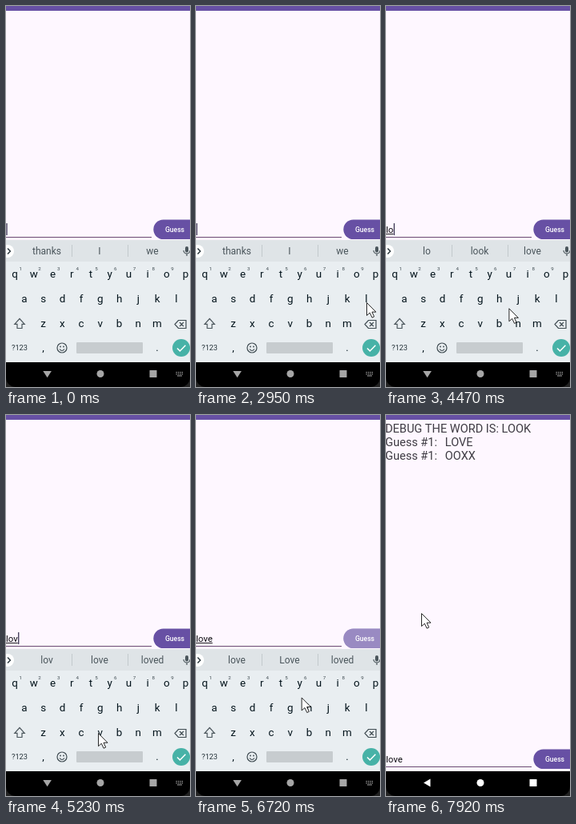
These frames come from a looping animation (230 by 477 pixels, 8000 ms). An HTML page with a canvas:

```html
<!DOCTYPE html>
<html lang="en">
<head>
<meta charset="utf-8">
<title>Word guess</title>
<style>
html, body { margin: 0; width: 100%; height: 100%; overflow: hidden; background: #000; }
canvas { display: block; }
</style>
</head>
<body>
<canvas id="stage" width="230" height="477"></canvas>
<script>
const screen2d = document.getElementById('stage').getContext('2d');
const layer = new OffscreenCanvas(230, 477);   // keyboard, faded as one piece
const layer2d = layer.getContext('2d');
let c = screen2d;

const PURPLE = '#6750a4', INK = '#04141c', LOOP = 8000;
const HIDE = 7380, HIDE_MS = 250, PAN = 151;

// time, typed text, suggestions
const typing = [
  [0, '', ['thanks', 'I', 'we']],
  [3150, 'l', ['l', 'let', 'love']],
  [4080, 'lo', ['lo', 'look', 'love']],
  [5080, 'lov', ['lov', 'love', 'loved']],
  [6000, 'love', ['love', 'Love', 'loved']]
];
const blinks = [280, 770, 1260, 1760, 2280, 2740];
// time, x, y
const mousePath = [
  [2740, 231, 345], [2950, 213, 371], [3400, 212, 370], [3640, 207, 343],
  [3820, 204, 339], [4150, 203, 338], [4700, 118, 407], [4820, 115, 399],
  [5300, 115, 398], [5650, 58, 336], [6050, 57, 336], [6400, 205, 279],
  [6550, 205, 279], [6720, 132, 353], [6950, 52, 454], [7460, 48, 451],
  [7820, 44, 252], [7920, 44, 248]
];

const clamp = v => Math.max(0, Math.min(1, v));

function text(s, x, y, size, color, align = 'center', weight = 400) {
  c.font = `${weight} ${size}px Roboto, sans-serif`;
  c.fillStyle = color;
  c.textAlign = align;
  c.fillText(s, x, y);
}
function box(x, y, w, h, color, r = 0) {
  c.fillStyle = color;
  c.beginPath();
  c.roundRect(x, y, w, h, r);
  c.fill();
}
function dot(x, y, r, color) { box(x - r, y - r, 2 * r, 2 * r, color, r); }
function path(d, stroke, fill, width = 1.2) {
  const p = new Path2D(d);
  if (fill) { c.fillStyle = fill; c.fill(p); }
  if (stroke) { c.strokeStyle = stroke; c.lineWidth = width; c.stroke(p); }
}

function caretOn(t, last) {
  return last ? (t - last) % 1000 < 500 : blinks.filter(b => b <= t).length % 2 === 0;
}

function drawApp(t, pan, typed, last) {
  c.save();
  c.translate(0, pan);
  box(0, 0, 230, 446, '#fef7ff');
  if (t >= 6550) {
    const gray = '#3f3c44';
    text('DEBUG THE WORD IS: LOOK', -1, 22, 14.55, gray, 'left');
    ['LOVE', 'OOXX'].forEach((word, i) => {
      text('Guess #1:', -1, 39 + 17 * i, 14.55, gray, 'left');
      text(word, 73.8, 39 + 17 * i, 14.55, gray, 'left');
    });
  }
  text(typed, 0, 435, 11.4, '#0c0a10', 'left');
  const w = c.measureText(typed).width;
  if (typed && t < HIDE) box(0, 436, w, 1, '#1d1b20');
  if (caretOn(t, last)) box(w + .3, 423, 1.4, 15, '#4a4360');
  box(0, 440, 182, 1, '#6a4a72');
  box(184.3, 418.4, 60, 24.6, PURPLE, 12.3);
  if (t > 6540 && t < 7000) {
    c.globalAlpha = .33 * clamp((t - 6540) / 80) * clamp((7000 - t) / 200);
    box(184.3, 418.4, 60, 24.6, '#fff', 12.3);
    c.globalAlpha = 1;
  }
  text('Guess', 211, 434, 8.6, '#fff', 'center', 500);
  c.restore();
  box(0, 0, 230, 6, PURPLE);
}

function keyRow(keys, x, y) {
  [...keys].forEach((k, i) => text(k, x + 23.72 * i, y, 13.4, INK));
}

function drawKeyboard(words) {
  box(0, 293, 230, 153, '#e9eef1');
  box(0, 293, 230, 27, '#dfe4e7');
  dot(2, 307, 8, '#fff');
  path('M2 303.5l3.4 3.5-3.4 3.5', '#263238', null, 1.4);
  if (words) {
    words.forEach((s, i) => text(s, 51 + 66 * i, 311, 12, '#4a555b'));
    box(82, 299, 1, 15, '#c3c9cc');
    box(152, 299, 1, 15, '#c3c9cc');
  }
  box(224, 301, 4, 7.5, '#4b565c', 2);
  path('M222 306a4 4 0 0 0 8 0M226 310v3', '#4b565c', null, 1.2);

  keyRow('qwertyuiop', 11, 340);
  [...'123456789'].forEach((n, i) => text(n, 18.2 + 23.72 * i, 331, 6.2, '#3f4b51'));
  keyRow('asdfghjkl', 23, 370.5);
  keyRow('zxcvbnm', 46.6, 402);
  path('M17 391.5l6.2 6.8h-3.2v5.2h-6v-5.2h-3.2z', '#4b565c');
  path('M215.5 393.5h9.5v10h-9.5l-4.5-5zM217 396l5 5M222 396l-5 5', '#3f4b51');

  text('?123', 17, 431, 9.2, '#26333a');
  text(',', 46.5, 432, 13, INK);
  path('M76 428a6 6 0 1 1-12 0a6 6 0 1 1 12 0M67 429.5q3 4 6 0', '#3f4b51');
  dot(68, 426.5, .9, '#3f4b51');
  dot(72, 426.5, .9, '#3f4b51');
  box(88, 421, 83, 14, '#c7cccf', 1);
  text('.', 189, 432, 13, INK);
  dot(219, 428, 11, '#47b2a7');
  path('M214 428.5l3.4 3.4 7-7.2', '#fff', null, 1.5);
}

function fadeKeyboard(words, k) {
  layer2d.clearRect(0, 0, 230, 477);
  c = layer2d;
  drawKeyboard(words);
  c = screen2d;
  c.globalAlpha = 1 - k ** 1.4;
  c.drawImage(layer, 0, Math.round(22 * k));
  c.globalAlpha = 1;
}

function drawNav(t) {
  const open = t < HIDE, color = open ? '#a6a6a6' : '#fff';
  const press = clamp((t - 7300) / 80) * clamp((7780 - t) / 200);
  if (press) {
    c.globalAlpha = press;
    box(23, 446.5, 58, 28, 'rgba(120,120,120,.3)', 14);
    c.globalAlpha = 1;
  }
  path(open ? 'M46.3 457h10.6l-5.3 8.3z' : 'M55.5 455.5v10l-8.5-5z', null, color);
  dot(118, 460.5, 4.5, color);
  box(179.5, 456, 9, 9, color, .5);
  if (open) {
    for (let i = 0; i < 8; i++) box(212.5 + 2.4 * (i % 4), 458 + 2.2 * (i >> 2), 1.3, 1.2, color);
    box(214, 462.5, 6, 1, color);
  }
}

function drawMouse(t) {
  const i = mousePath.findIndex(p => p[0] > t);
  if (i === 0) return;
  const b = i < 0 ? mousePath.at(-1) : mousePath[i];
  const a = i < 0 ? b : mousePath[i - 1];
  const k = i < 0 ? 0 : (t - a[0]) / (b[0] - a[0]);
  c.save();
  c.translate(a[1] + (b[1] - a[1]) * k, a[2] + (b[2] - a[2]) * k);
  path('M.5.5v16l3.8-3.4 2.8 6 2.6-1.2-2.7-5.8h5z', '#111', '#fff', .9);
  c.restore();
}

function draw(now) {
  const t = now % LOOP;
  const [last, typed, words] = typing.findLast(s => s[0] <= t);
  const k = clamp((t - HIDE) / HIDE_MS);
  box(0, 0, 230, 477, '#222');
  box(0, 0, 230, 477, '#000', [0, 0, 12, 12]);
  drawApp(t, Math.round(-PAN * (1 - k) ** 3), typed, last);
  if (k < 1) fadeKeyboard(t < 7340 && words, k);
  drawNav(t);
  drawMouse(t);
  requestAnimationFrame(draw);
}
requestAnimationFrame(draw);
</script>
</body>
</html>
```
